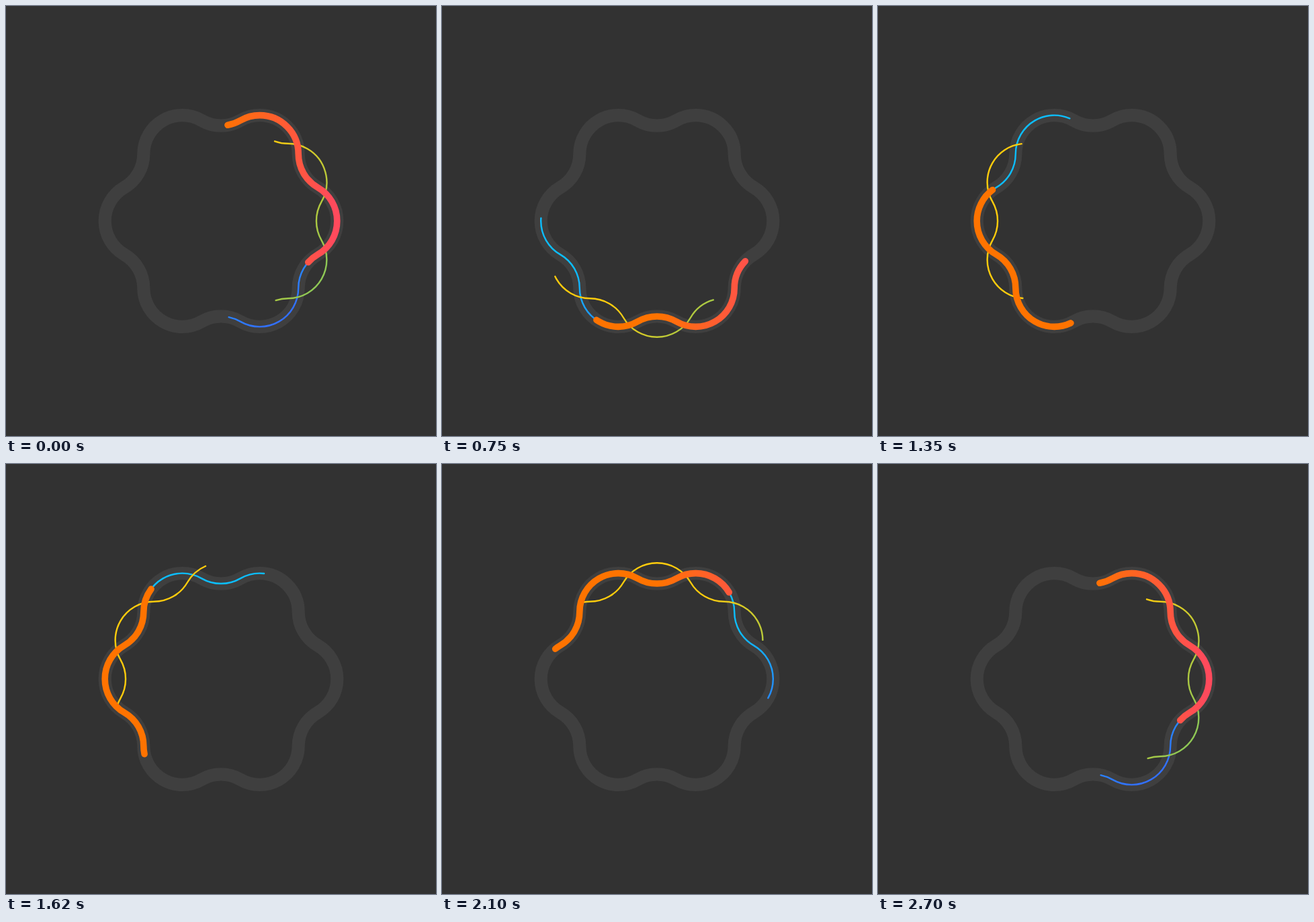
Write an HTML page that moves like this. It is 640x640 px and loops after 2.76 s.

```html
<!DOCTYPE html>
<html lang="en">
<head>
<meta charset="utf-8">
<title>Wavy ring</title>
<style>
  html, body { margin: 0; width: 100%; height: 100%; overflow: hidden; background: #323232; }
  svg { display: block; width: 100%; height: 100%; }
  use { fill: none; stroke-linecap: round; }
  .track { stroke: #3f3f3f; stroke-width: .333; }
  .run {
    stroke-width: .0417;
    stroke-dasharray: 302.4 777.6;
    animation: run 2760ms infinite;
  }
  .bold { stroke-width: .1667; }
  /* One lap in 90 ticks of 30 ms, then a 60 ms rest */
  @keyframes run {
    0% { stroke-dashoffset: 0; animation-timing-function: steps(90, end); }
    97.826087%, 100% { stroke-dashoffset: -1080; }
  }
</style>
</head>
<body>
<svg viewBox="0 0 640 640">
  <defs>
    <!-- Unit arcs: six 120° lobes joined by 60° valleys -->
    <path id="ring" pathLength="1080" d="M1-2.73205
      A1 1 0 0 1 2-1.73205 A1 1 0 0 0 2.5-.86603
      A1 1 0 0 1 2.5 .86603 A1 1 0 0 0 2 1.73205
      A1 1 0 0 1 .5 2.59808 A1 1 0 0 0-.5 2.59808
      A1 1 0 0 1-2 1.73205 A1 1 0 0 0-2.5 .86603
      A1 1 0 0 1-2.5-.86603 A1 1 0 0 0-2-1.73205
      A1 1 0 0 1-.5-2.59808 A1 1 0 0 0 .5-2.59808
      A1 1 0 0 1 1-2.73205Z"/>
    <linearGradient id="warm" gradientUnits="userSpaceOnUse" x1="0" y1="0" x2="2.9" y2="0">
      <stop stop-color="#ff7300"/><stop offset="1" stop-color="#ff4a5c"/>
    </linearGradient>
    <linearGradient id="lime" gradientUnits="userSpaceOnUse" x1="0" y1="0" x2="2.9" y2="0">
      <stop stop-color="#ffcc0c"/><stop offset="1" stop-color="#8fc855"/>
    </linearGradient>
    <linearGradient id="cool" gradientUnits="userSpaceOnUse" x1="0" y1="0" x2="2.9" y2="0">
      <stop stop-color="#0cbeff"/><stop offset="1" stop-color="#3270ff"/>
    </linearGradient>
  </defs>
  <g transform="translate(320 320) scale(57.6)">
    <use href="#ring" class="track"/>
    <use href="#ring" class="run" stroke="url(#cool)" transform="rotate(60)"/>
    <use href="#ring" class="run" stroke="url(#lime)" transform="rotate(30)"/>
    <use href="#ring" class="run bold" stroke="url(#warm)"/>
  </g>
</svg>
</body>
</html>
```
